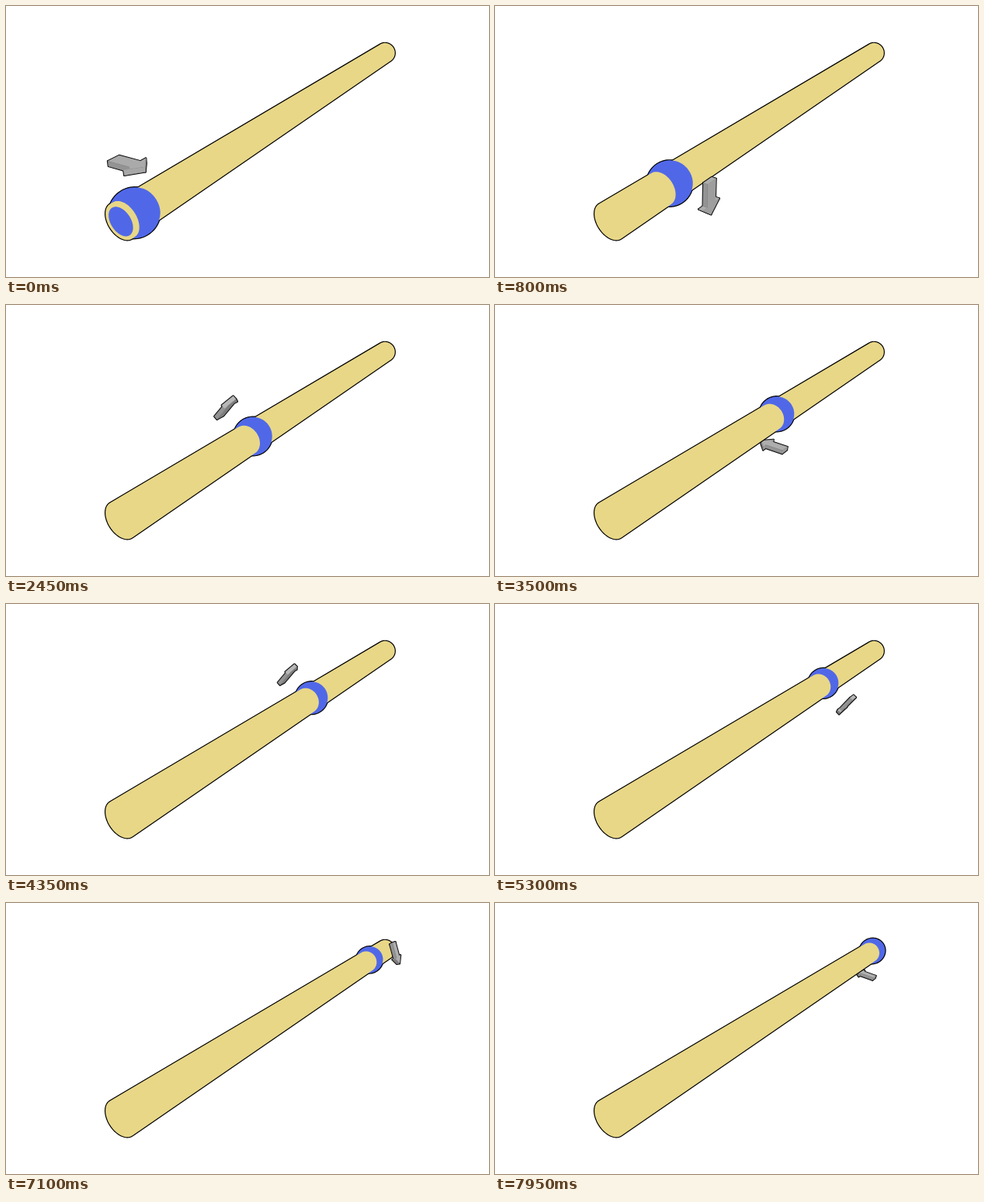
Write an HTML page with a canvas that moves like this. It is 622 by 350 pixels and loops after 8000 ms.

```html
<!DOCTYPE html>
<html lang="en">
<head>
<meta charset="utf-8">
<title>Ball on a rod</title>
<style>
  html, body { margin: 0; width: 100%; height: 100%; overflow: hidden; background: #fff; }
  canvas { display: block; width: 622px; height: 350px; }
</style>
</head>
<body>
<canvas id="stage" width="622" height="350"></canvas>
<script>
const ctx = document.getElementById('stage').getContext('2d');
const LOOP = 8000, STEP = 50;
const FOCAL = 720;
const YELLOW = '#e8d787', BLUE = '#5068e8';

// Vectors: x right, y down, z away from the eye
const add = (a, b, k = 1) => a.map((v, i) => v + b[i] * k);
const dot = (a, b) => a[0] * b[0] + a[1] * b[1] + a[2] * b[2];
const cross = (a, b) => [
  a[1] * b[2] - a[2] * b[1],
  a[2] * b[0] - a[0] * b[2],
  a[0] * b[1] - a[1] * b[0]
];
const scale = (a, k) => a.map(v => v * k);
const unit = a => scale(a, 1 / Math.hypot(...a));
const project = p => [311 + p[0] * FOCAL / p[2], 175 + p[1] * FOCAL / p[2]];

const START = [-145.4, 92, FOCAL];
const AXIS = unit([483.6, -310.7, FOCAL]);
const SIDE = unit([-AXIS[1], AXIS[0], 0]);
const BACK = cross(AXIS, SIDE);
const LIGHT = [0.3, -0.45, -0.84];

const TRAVEL = 961;
const BALL = 32.7, ROD = 25.8;
const ROD_FRONT = -25.5, ROD_END = TRAVEL + 10;
const CUT = Math.sqrt(BALL * BALL - ROD * ROD);

const ORBIT = 68;
const TURN_START = 218, TURN_STEP = 28.38;
// Arrow outline: along its flight, across it
const ARROW = [[-26, -10], [10, -10], [10, -20], [26, 0], [10, 20], [10, 10], [-26, 10]];
const THICK = 3.5;

const onAxis = s => add(START, AXIS, s);

function circle(center, radius, u, v) {
  return Array.from({ length: 96 }, (_, i) => {
    const a = i / 96 * Math.PI * 2;
    return add(add(center, u, radius * Math.cos(a)), v, radius * Math.sin(a));
  });
}

const ring = (s, radius = ROD) => circle(onAxis(s), radius, SIDE, BACK);

function hull(points) {
  const pts = points.map(project).sort((a, b) => a[0] - b[0] || a[1] - b[1]);
  const half = list => {
    const out = [];
    for (const p of list) {
      while (out.length > 1) {
        const a = out[out.length - 2], b = out[out.length - 1];
        if ((b[0] - a[0]) * (p[1] - a[1]) - (b[1] - a[1]) * (p[0] - a[0]) > 0) break;
        out.pop();
      }
      out.push(p);
    }
    return out.slice(0, -1);
  };
  return [...half(pts), ...half(pts.reverse())];
}

function trace(pts) {
  ctx.beginPath();
  pts.forEach(p => ctx.lineTo(p[0], p[1]));
  ctx.closePath();
}

function fill(pts, color) {
  trace(pts);
  ctx.fillStyle = color;
  ctx.fill();
}

function outline(pts, color = '#000', width = 2.4) {
  trace(pts);
  ctx.strokeStyle = color;
  ctx.lineWidth = width;
  ctx.stroke();
}

function ballRim(center) {
  const d2 = dot(center, center);
  const k = 1 - BALL * BALL / d2;
  const u = unit(cross(center, AXIS));
  const v = unit(cross(center, u));
  return circle(scale(center, k), BALL * Math.sqrt(k), u, v);
}

function drawRodAndBall(s) {
  const rim = ballRim(onAxis(s));
  const far = hull([...ring(Math.min(s, ROD_END)), ...ring(ROD_END)]);
  const near = hull([...ring(ROD_FRONT), ...ring(s - CUT)]);
  // Part of the ball in front of a cut across the axis
  const ballUpTo = end => {
    const radius = Math.sqrt(BALL * BALL - (end - s) ** 2);
    const front = rim.filter(p => dot(add(p, START, -1), AXIS) <= end);
    return hull([...front, ...ring(end, radius)]);
  };

  [far, near, hull(rim)].forEach(shape => outline(shape));
  fill(far, YELLOW);
  fill(ballUpTo(s + CUT), BLUE);
  fill(near, YELLOW);
  if (s - BALL < ROD_FRONT) fill(ballUpTo(ROD_FRONT), BLUE);
}

function drawArrow(s, angle) {
  const c = Math.cos(angle), n = Math.sin(angle);
  const out = add(scale(SIDE, c), BACK, n);
  const ahead = add(scale(SIDE, -n), BACK, c);
  const mid = add(onAxis(s), out, ORBIT);
  const layer = h => ARROW.map(([l, w]) =>
    add(add(add(mid, ahead, l), AXIS, w), out, h));
  const top = layer(THICK), base = layer(-THICK);

  const faces = [{ pts: top, normal: out }, { pts: base, normal: scale(out, -1) }];
  ARROW.forEach(([l, w], i) => {
    const j = (i + 1) % ARROW.length;
    const dl = ARROW[j][0] - l, dw = ARROW[j][1] - w;
    faces.push({
      pts: [top[i], top[j], base[j], base[i]],
      normal: unit(add(scale(ahead, dw), AXIS, -dl))
    });
  });

  const depth = f => f.pts.reduce((sum, p) => sum + p[2], 0) / f.pts.length;
  const seen = faces.filter(f => dot(f.normal, f.pts[0]) < 0)
    .sort((a, b) => depth(b) - depth(a))
    .map(f => ({ pts: f.pts.map(project), normal: f.normal }));
  seen.forEach(f => outline(f.pts));
  seen.forEach(f => {
    const g = Math.round(125 + 62 * Math.max(0, dot(f.normal, LIGHT)));
    const gray = `rgb(${g},${g},${g})`;
    fill(f.pts, gray);
    outline(f.pts, gray, 0.5);
  });
}

function draw(time) {
  const step = Math.floor(time % LOOP / STEP);
  const s = TRAVEL * step * STEP / LOOP;
  const angle = (TURN_START + TURN_STEP * step) * Math.PI / 180;
  const behind = Math.sin(angle) > 0;

  ctx.fillStyle = '#fff';
  ctx.fillRect(0, 0, 622, 350);
  ctx.lineJoin = 'round';
  if (behind) drawArrow(s, angle);
  drawRodAndBall(s);
  if (!behind) drawArrow(s, angle);
}

const begin = performance.now();
function tick() {
  draw(performance.now() - begin);
  requestAnimationFrame(tick);
}
tick();
</script>
</body>
</html>
```
